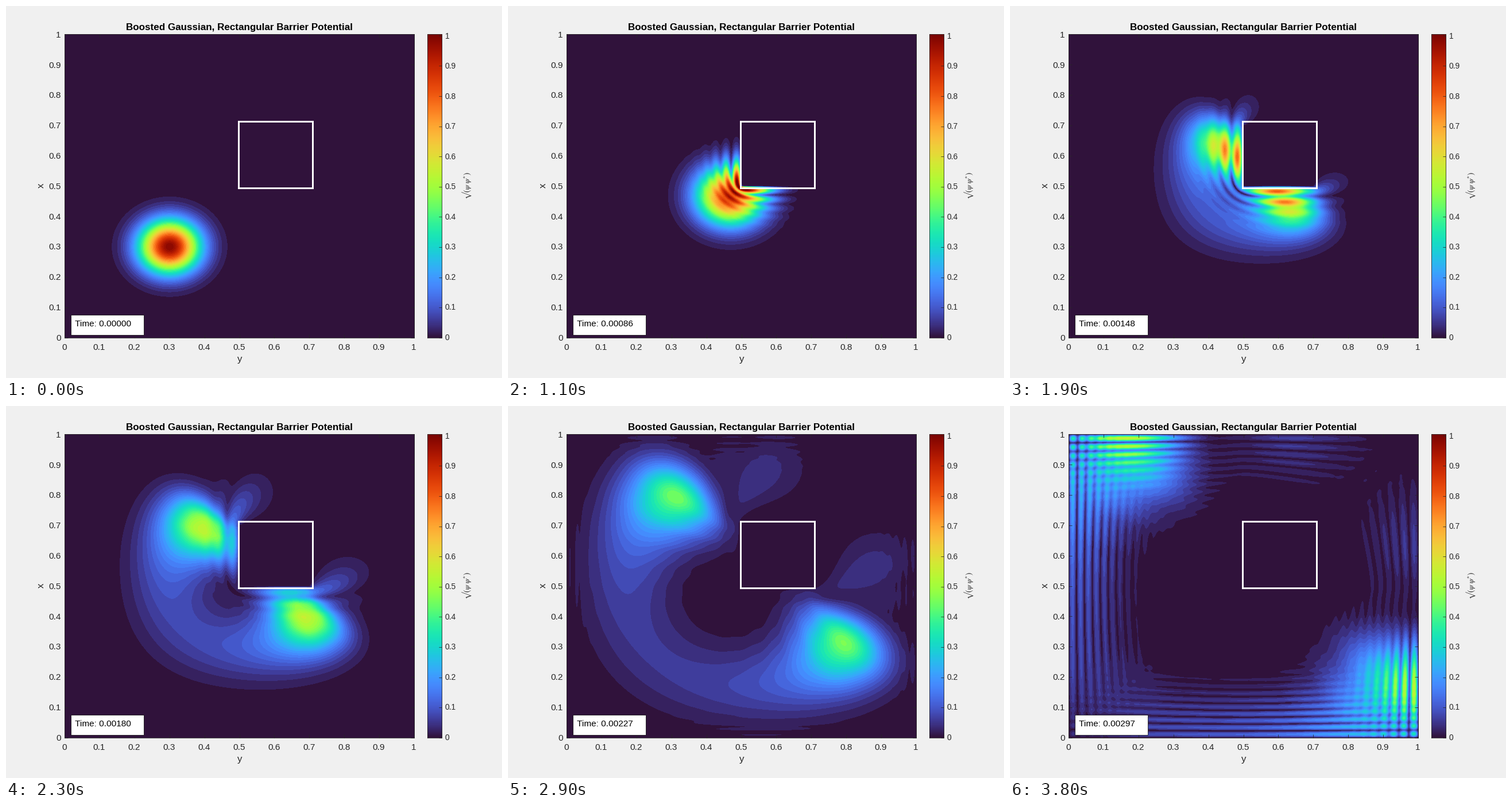
Recreate the animation shown at these times as a matplotlib script. Size 864 px wide and 648 px high, loop 3.9 s.

```python
import numpy as np
import matplotlib.pyplot as plt
from matplotlib.animation import FuncAnimation
from matplotlib.colors import BoundaryNorm, ListedColormap
from matplotlib.patches import Rectangle

W, H, DPI = 864, 648, 100
FRAMES, INTERVAL = 39, 100
INK = "#262626"

# Simulation: i psi_t = -lap(psi) + V psi on the unit square, zero at the edges
N = 512
STEP = 1 / N
DT = 0.01 * STEP
STEPS_PER_FRAME = 4
START, WIDTH, MOMENTUM = 0.3, 0.0835, 100
BARRIER, HEIGHT = (0.5, 0.7), 1e6

# Plot area and colour scale
LEFT, RIGHT, TOP, BOTTOM = 102, 711, 49, 578
LEVEL, COLOR_MAX = 0.02, 1.005


def factor(diag, off):
    """Prepare a tridiagonal solve along axis 0 with constant off-diagonal."""
    inv = np.empty_like(diag)
    inv[0] = 1 / diag[0]
    for i in range(1, len(diag)):
        inv[i] = 1 / (diag[i] - off * off * inv[i - 1])
    return inv.astype(np.complex64), (off * inv).astype(np.complex64)


def solve(rhs, factors):
    inv, ratio = factors
    out = rhs * inv
    n = len(out)
    for i in range(1, n):
        out[i] -= ratio[i] * out[i - 1]
    for i in range(n - 2, -1, -1):
        out[i] -= ratio[i] * out[i + 1]
    return out


def simulate():
    """Alternating-direction Crank-Nicolson; returns |psi| for every frame."""
    grid = np.arange(1, N) * STEP
    r = DT / (2 * STEP**2)
    wall = (grid >= BARRIER[0]) & (grid <= BARRIER[1])
    v = 0.5 * DT * HEIGHT * np.outer(wall, wall)
    along_x = factor(np.full((N - 1, 1), 1 + 2j * r), -1j * r)
    along_y = factor(1 + 2j * r + 1j * v, -1j * r)

    line = np.exp(-((grid - START) / WIDTH) ** 2 + 1j * MOMENTUM * grid)
    psi = np.outer(line, line)
    padded = np.pad(psi, ((1, 1), (0, 0)))
    chi = psi + 1j * r * (padded[2:] - 2 * psi + padded[:-2]) - 1j * v * psi
    chi = chi.astype(np.complex64)

    fields = [np.pad(np.abs(psi).T, 1)]
    for step in range(1, (FRAMES - 1) * STEPS_PER_FRAME + 1):
        turned = np.ascontiguousarray(chi.T)
        turned = 2 * solve(turned, along_x) - turned
        chi = np.ascontiguousarray(turned.T)
        psi = solve(chi, along_y)
        chi = 2 * psi - chi
        if step % STEPS_PER_FRAME == 0:
            fields.append(np.pad(np.abs(psi).T, 1))
    return fields


def pt(px):
    return px * 72 / DPI


def box(left, top, right, bottom):
    return [left / W, 1 - bottom / H, (right - left) / W, (bottom - top) / H]


plt.rcParams["font.family"] = "Liberation Sans"
fields = simulate()

fig = plt.figure(figsize=(W / DPI, H / DPI), dpi=DPI, facecolor="#f0f0f0")

# Wave field in filled bands
levels = np.arange(0, 1 + LEVEL / 2, LEVEL)
turbo = plt.get_cmap("turbo")
bands = ListedColormap(turbo(levels[:-1] / COLOR_MAX))
bands.set_over(turbo(1.0))
ax = fig.add_axes(box(LEFT, TOP, RIGHT, BOTTOM))
edge = STEP / 2
image = ax.imshow(fields[0], cmap=bands, norm=BoundaryNorm(levels, bands.N),
                  origin="lower", extent=(-edge, 1 + edge, -edge, 1 + edge),
                  interpolation="bilinear", interpolation_stage="data",
                  aspect="auto")
ax.set(xlim=(0, 1), ylim=(0, 1))
ticks = np.arange(11) / 10
ax.set_xticks(ticks)
ax.set_yticks(ticks)
ax.tick_params(direction="in", length=pt(6), width=pt(0.8), color=INK,
               top=True, right=True, labelbottom=False, labelleft=False)

# Colour bar
bar = fig.add_axes(box(734, TOP, 759, BOTTOM))
bar.imshow(np.linspace(0, 1, 256)[:, None], cmap="turbo", origin="lower",
           extent=(0, 1, 0, COLOR_MAX), aspect="auto")
bar.set_xticks([])
bar.set_yticks(ticks)
bar.tick_params(direction="in", length=pt(5), width=pt(0.8), color=INK,
                left=False, right=True, labelleft=False)
for axes in (ax, bar):
    for spine in axes.spines.values():
        spine.set(linewidth=pt(0.8), color=INK)

# Overlay in pixel coordinates
stage = fig.add_axes([0, 0, 1, 1], zorder=5)
stage.set(xlim=(0, W), ylim=(H, 0))
stage.axis("off")


def label(x, y, text, size, color=INK, **kw):
    style = dict(ha="center", va="baseline")
    style.update(kw)
    return stage.text(x, y, text, fontsize=pt(size), color=color, **style)


label(406.5, 42.3, "Boosted Gaussian, Rectangular Barrier Potential", 17,
      "black", weight="bold")
for t in ticks:
    name = f"{t:g}"
    label(101.5 + 609 * t, 598.7, name, 15.4)
    label(95.5, 582.7 - 528 * t, name, 15.4, ha="right")
    label(764.5, 582 - 525.3 * t, name, 13.9, ha="left")
label(406.5, 620, "y", 17)
label(61.5, 312.5, "x", 17, rotation=90, va="center")
label(803, 312.5, r"$√(\psi\ \psi^{*})$", 13.5, rotation=90, va="center",
      math_fontfamily="stix")

stage.add_patch(Rectangle((404.5, 200.5), 129.5, 116, fill=False,
                          edgecolor="white", linewidth=pt(3)))
stage.add_patch(Rectangle((112.5, 538), 127.5, 34.5, facecolor="white",
                          edgecolor="black", linewidth=pt(0.7)))
clock = label(120, 558, "", 15.4, "black", ha="left")


def draw(frame):
    image.set_data(fields[frame])
    clock.set_text(f"Time: {frame * STEPS_PER_FRAME * DT:.5f}")
    return image, clock


anim = FuncAnimation(fig, draw, frames=FRAMES, interval=INTERVAL,
                     repeat=True, repeat_delay=0)
plt.show()
```
